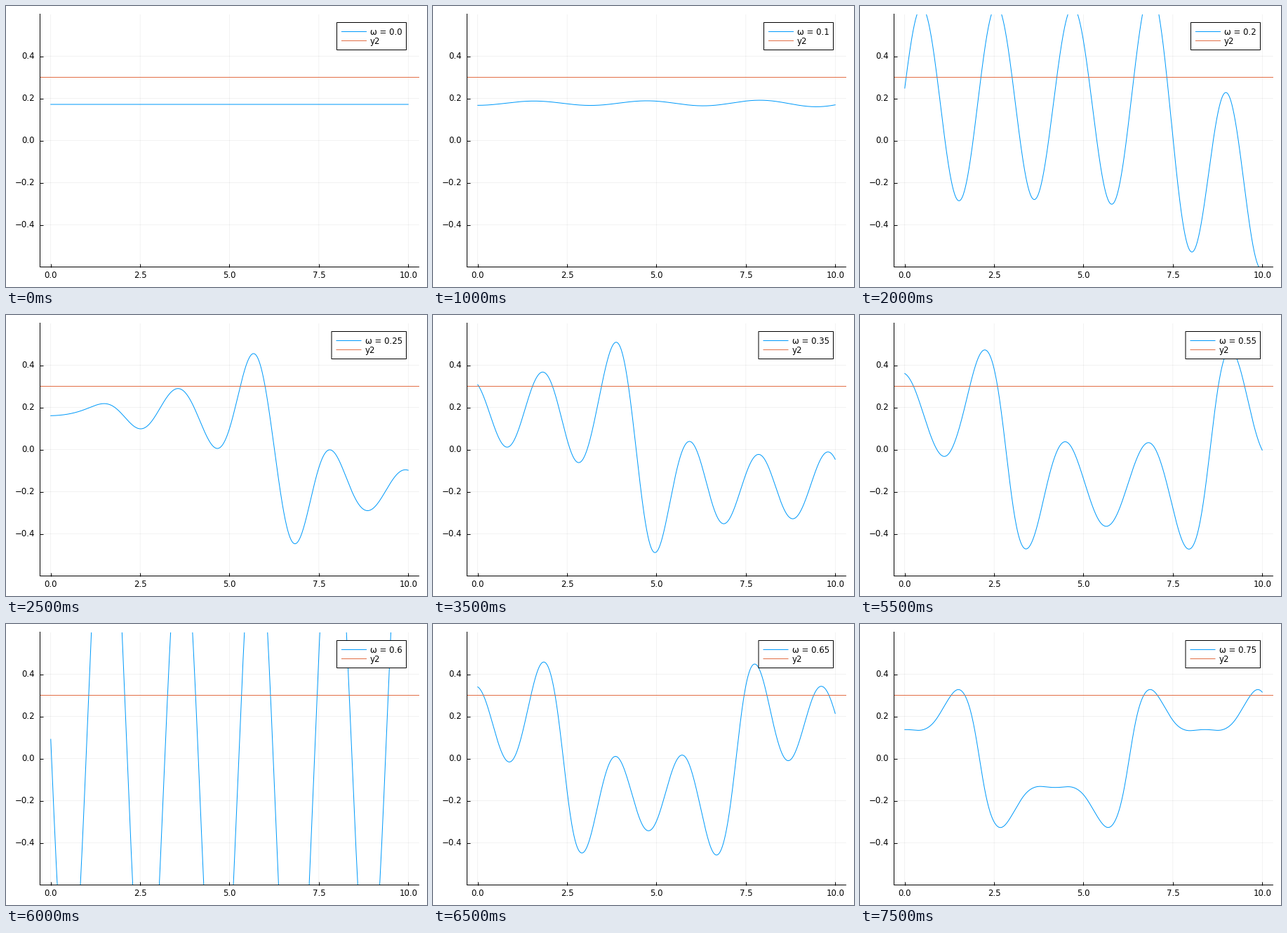
Animation, 600 px wide and 400 px high, one loop 8 s. Source, as a matplotlib script:

```python
import matplotlib.pyplot as plt
import numpy as np
from matplotlib.animation import FuncAnimation
from matplotlib.patches import Rectangle

W, H, DPI = 600, 400, 100
PX = 72 / DPI
FONT = 11.8 * PX
BLUE, ORANGE = "#009AFA", "#E26F46"
LEFT, RIGHT, TOP, BOTTOM = 48.5, 588.5, 11.5, 371.5

FORCE, STIFFNESS, DAMPING = 2.03, 9.0, 0.1
ODD = np.arange(1, 20, 2)[:, None]
SIGNS = (-1.0) ** np.arange(len(ODD))[:, None]
t = np.linspace(0, 10, 1001)


def response(omega):
    """Sum of ten odd harmonics, each with a resonant amplitude and phase."""
    detune = STIFFNESS - ODD**2 * omega**2
    drag = DAMPING * ODD * omega
    amp = SIGNS * FORCE / ODD / np.hypot(detune, drag)
    phase = np.arctan2(drag, detune**2)
    return (amp * np.cos(ODD * omega * t + phase)).sum(axis=0)


plt.rcParams.update({
    "font.family": "DejaVu Sans",
    "path.snap": False,
    "ytick.alignment": "center",
})
fig = plt.figure(figsize=(W / DPI, H / DPI), dpi=DPI, facecolor="white")

ax = fig.add_axes([LEFT / W, 1 - BOTTOM / H, (RIGHT - LEFT) / W, (BOTTOM - TOP) / H])
ax.set(xlim=(-0.3, 10.3), ylim=(-0.6, 0.6))
ax.set_xticks(np.arange(0, 10.1, 2.5))
ax.set_yticks([-0.4, -0.2, 0, 0.2, 0.4])
ax.xaxis.set_major_formatter("{x:.1f}")
ax.yaxis.set_major_formatter("{x:.1f}")
ax.set_axisbelow(True)
ax.grid(color="black", alpha=0.1, lw=0.5 * PX)
ax.tick_params(direction="in", length=5 * PX, width=PX, labelsize=FONT)
ax.tick_params(axis="x", pad=5.2 * PX)
ax.tick_params(axis="y", pad=7.5 * PX)
for side in ("top", "right"):
    ax.spines[side].set_visible(False)
for side in ("left", "bottom"):
    ax.spines[side].set_linewidth(PX)

curve, = ax.plot([], [], color=BLUE, lw=PX, zorder=2)
ax.axhline(0.3, color=ORANGE, lw=PX, zorder=2.1)

# legend layer in pixel coordinates
top = fig.add_axes([0, 0, 1, 1])
top.set(xlim=(0, W), ylim=(H, 0))
top.axis("off")
box = Rectangle((0, 23.5), 0, 39, fc="white", ec="black", lw=PX)
top.add_patch(box)
rows = []
for y, color, name in ((36.5, BLUE, ""), (49.5, ORANGE, "y2")):
    key, = top.plot([], [], color=color, lw=PX, solid_capstyle="butt")
    text = top.text(0, y + 4.5, name, fontsize=FONT, va="baseline")
    rows.append((key, text, y))


def draw(i):
    omega = round(0.05 * i, 2)
    label = f"ω = {omega}"
    curve.set_data(t, response(omega))
    x = 471.5 if len(label) == 7 else 464
    box.set_x(x)
    box.set_width(570.5 - x)
    rows[0][1].set_text(label)
    for key, text, y in rows:
        key.set_data([x + 6.5, x + 42.5], [y, y])
        text.set_x(x + 47.5)
    return [curve, box] + [a for row in rows for a in row[:2]]


anim = FuncAnimation(fig, draw, frames=16, interval=500, repeat=True, repeat_delay=0)
plt.show()
```
